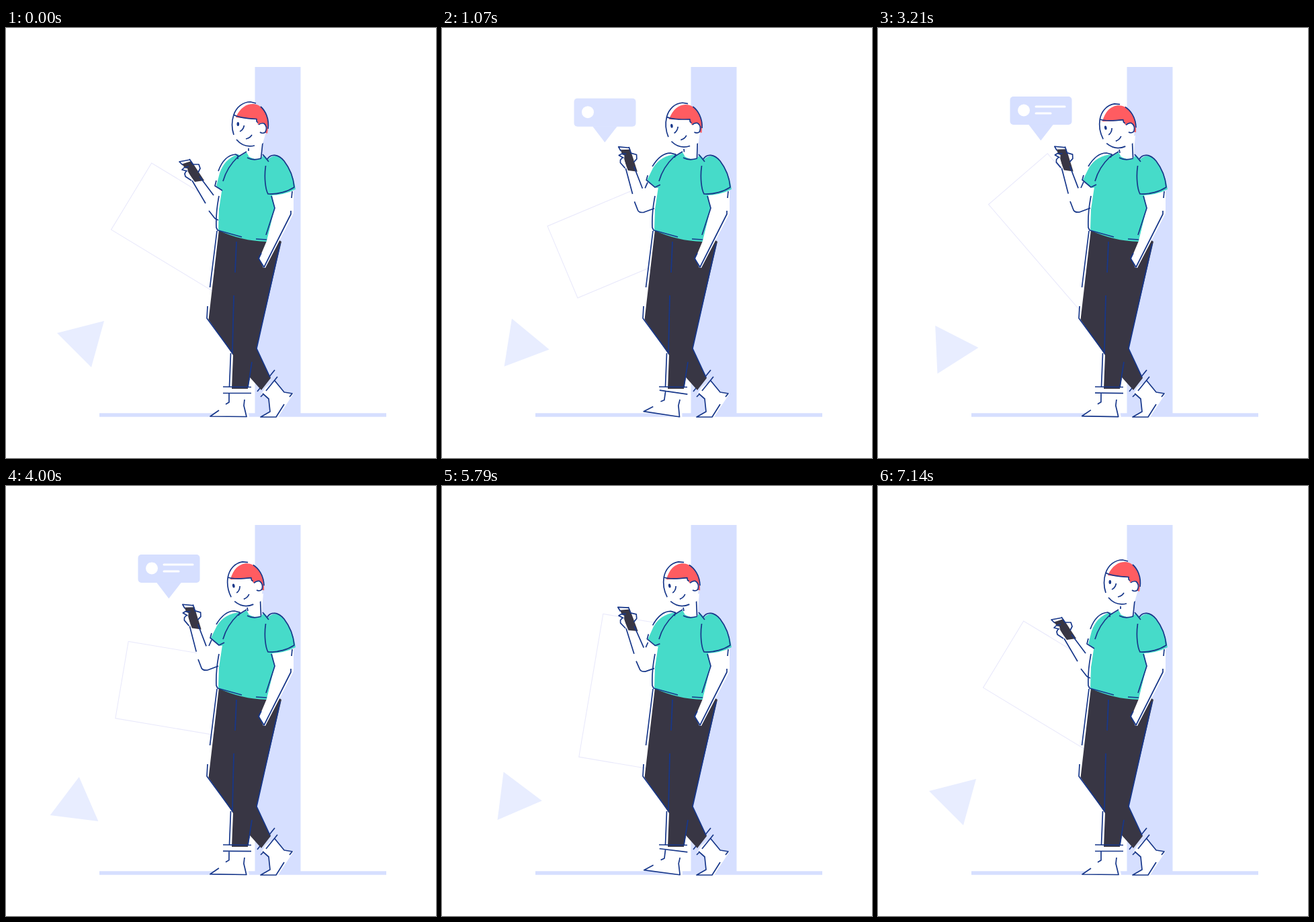
An HTML page for the animation above (7210 ms loop, 640 px wide and 640 px high).

```html
<!DOCTYPE html>
<html lang="en">
<head>
<meta charset="utf-8">
<title>Man with phone</title>
<style>
  html, body { margin: 0; width: 100%; height: 100%; overflow: hidden; background: #fff; }
  svg { display: block; width: 100%; height: 100%; }
  .line { fill: none; stroke: #17378a; stroke-width: 1.7; stroke-linejoin: round; }
  .white { fill: #fff; }
  .lilac { fill: #d6dfff; }
  .teal { fill: #46dbc9; }
  .dark { fill: #383644; }
  .red { fill: #ff5c61; }
  .text { stroke: #fff; stroke-width: 3; stroke-linecap: round; }
</style>
</head>
<body>
<svg viewBox="0 0 640 640">
  <rect id="frame" x="171" y="248.5" width="216" height="116" fill="none" stroke="#e9e9fb" stroke-width="1.1"/>
  <path id="triangle" d="M76,454 L146,436 L127,505Z" fill="#e8edff"/>
  <path class="lilac" d="M370.5,58 H438.5 V573.2 H566 V578.8 H139 V573.2 H370.5Z"/>

  <g id="bubble">
    <rect class="lilac" x="196.5" y="102" width="92" height="42" rx="5"/>
    <path class="lilac" d="M224,143.5 H261 L242.3,167.5Z"/>
    <circle class="white" cx="217" cy="122.5" r="9"/>
    <path id="text1" class="text"/>
    <path id="text2" class="text"/>
  </g>

  <!-- right foot -->
  <path class="white" d="M380,545 L386,535 L400,525 L414,541 L428,544 L405,579 H380 L393,571 L391,552Z"/>
  <path class="line" d="M374,541 L400,509 M379,549 L383,545 M387,540 L404,519 M400,525 L414,542 L426,544 L422,549 M414,560 L402,579 H379 L393,571 L391,552 L382,544"/>

  <!-- left foot -->
  <g id="foot">
    <path class="white" d="M332,536 L331,557 L304,578 L362,579 L358,553 L359,536Z"/>
    <path class="line" d="M323,543.5 H365 M332,544 V557 L327,560 M317,569 L304,578 L358,578.5 L354,562 L355,553"/>
  </g>
  <path class="white" d="M334,525 H362 V540 H334Z"/>

  <!-- trousers -->
  <path class="dark" d="M317,300 L301.5,434 L338,487 L336,537 H360 L363,520 L380,539 L394,521 L373,477 L410,318 L407,316Z"/>
  <path class="line" d="M323,534 L365,534.5 M314,302 L303.5,386 M300,414 L299,432 L338,485 M334.5,484 L332.5,534 M343,318 L341,364 M339,398 L337,482 M408,321 L373,477 L393,520 M366,497 L360,535"/>

  <!-- raised arm -->
  <path id="armFill" class="white"/>
  <path id="elbow" class="line"/>
  <g id="forearm">
    <path class="white" d="M258,199 L274,195 L279,203 L288,203 L289,209 L286,216 L290,223 L278,228 L268,222 L262,212Z"/>
    <path class="dark" d="M262,202.5 L276,198 L295,227 L281,229Z"/>
    <path class="white" d="M263,208 L270,209 L271,214 L275,221 L277,226 L268,221 L266,214Z"/>
    <path class="line" d="M274,196 L258,199 L263,204 M273,195 L279,204 M278,203 L287,203 L289,209 L286,215 M272,206 L265,208 L262,211 L270,213 M268,213 L266,217 L267,221 L276,227 M288,221 L309,249 M277,227 L297,261"/>
  </g>
  <path id="sleeveFill" class="teal"/>

  <!-- shirt -->
  <path class="teal" d="M358,185 L361,190 Q370,198 380,193 L384,189 L392,197 L400,268 L388,318 Q350,317 316,301 L317,270 L323,230 Q331,206 347,192Z"/>
  <path id="neck" class="white" d="M361,168 V191 Q370,197 380,193 L383,160Z"/>
  <path id="neckLines" class="line"/>
  <path id="sleeve" class="line"/>
  <path class="line" d="M323,228 Q329,207 345,192 L358,184 M359,193 Q368,198 380,194 M317,250 Q312,275 313,297 L315,301 L351,311 M372,314 L388,315"/>

  <!-- resting arm -->
  <path class="white" d="M396,249 L428,242 L428,276 L386,357 L383,357 L377,343 L388,317 L400,268Z"/>
  <path class="teal" d="M388,198 Q396,188 406,191 Q426,206 431,240 Q414,249 392,249 Q386,235 388,198Z"/>
  <path class="line" d="M382,188 L391,199 M389,195 C394,187 405,187 414,198 C424,211 428,225 429,237 C420,243 405,248 390,247 C386,240 384,222 386.5,205 M426,243 L425,253 M424,272 V277 L384,356 L376,343 L380,335 M395,250 L400,268 L387,308"/>

  <!-- head -->
  <g id="head">
    <path class="white" d="M339,127 Q334,150 343,166 Q354,179 370,175 L382,172 L387,155 L388,130 L366,111Z"/>
    <path class="red" d="M342,133 C349,118 358,113 368,113 C382,114 389,128 391,142 L389,157 L386,156 L384,143 L375,144 L373,136 L351,134Z"/>
    <path class="white" d="M375,144 Q379,140 384,142 Q390,147 386,155 Q381,158 375,154Z"/>
    <path class="line" d="M339,159 Q334,144 339,129 C343,118 352,110 364,110 L372,112 M379,117 C386,123 392,135 390,150 M343,166 Q354,179 370,175 M339,129 Q346,134 373,135.5 L373,139 L375,141 M376,144 Q379,141 384,142 Q390,147 386,155 Q382,158 378,155 M354.5,145 Q353,152 348,154 M357,165 Q363,164 366,159"/>
    <ellipse cx="345.3" cy="143" rx="1.8" ry="3" fill="#17378a"/>
  </g>
</svg>
<script>
const LOOP = 7210, STEP = 71.4, STEPS = 100;
const parts = {};
document.querySelectorAll('[id]').forEach(el => parts[el.id] = el);

const ramp = (t, from, to) => Math.min(1, Math.max(0, (t - from) / (to - from)));
const smooth = s => s * s * (3 - 2 * s);
const there = (t, a, b, c, d) => smooth(ramp(t, a, b)) - smooth(ramp(t, c, d));
const set = (id, name, value) => parts[id].setAttribute(name, value);

// Blends two paths that share the same commands.
function mix(a, b, k) {
  const ends = b.match(/-?[\d.]+/g);
  let i = 0;
  return a.replace(/-?[\d.]+/g, n => +n + (ends[i++] - n) * k);
}

// Paths with the arm lowered and raised.
const armPaths = {
  armFill: ['M278,227 L297,261 L312,285 L316,287 L322,242 L309,249 L290,222Z',
            'M275,208 L283,245 L292,274 L318,269 L320,236 L300,237 L289,212Z'],
  elbow: ['M302,272 L309,281 Q312,285 314,285 L316,286 M309,249 L309,249',
          'M286,258 L291,271 Q293,275 300,274 L316,268 M302,238 L306,229'],
  sleeveFill: ['M345,188 Q325,195 318,216 L313,235 L322,243 L335,240 L350,190Z',
               'M348,188 Q325,190 314,208 L305,226 L319,238 L335,235 L352,190Z'],
  sleeve: ['M316,213 C320,202 328,189 342,188 L345,190 L345,195 M313,227 L311,235 L319,240 L322,242',
           'M313,206 C319,196 328,186 340,186 L348,188 L346,193 M306,219 L304,226 L317,237 L325,233']
};
const neckPaths = ['M361,179 L361,183 M382,171 L379.5,194', 'M359,181 L360,186 M378.5,170 L379.5,193'];

function draw(t) {
  const turn = 360 * t / (STEP * STEPS);
  set('frame', 'transform', `rotate(${31.2 - turn} 279 306.5)`);
  set('triangle', 'transform', `rotate(${turn} 111 470.7)`);

  const arm = there(t, 427, 1141, 5585, 6299);
  for (const id in armPaths) set(id, 'd', mix(...armPaths[id], arm));
  set('forearm', 'transform', `translate(${0.5 * arm} ${-18 * arm}) rotate(${16 * arm} 277 212)`);

  const nod = there(t, 760, 1380, 5980, 6600);
  set('head', 'transform', `rotate(${-9.3 * nod} 376 186)`);
  set('neckLines', 'd', mix(...neckPaths, nod));

  // Nine toe taps per loop.
  const tap = (t / (STEP * STEPS) * 9 + 1e-9) % 1;
  const lift = (1 - Math.cos(2 * Math.PI * tap ** 0.85)) / 2;
  set('foot', 'transform', `rotate(${8.8 * lift} 354 547)`);

  const hidden = (1 - ramp(t, 500, 1570)) ** 3;
  const leave = smooth(ramp(t, 4800, 5500));
  set('bubble', 'transform', `translate(0 ${26 * hidden - 40 * leave})`);
  set('bubble', 'opacity', (1 - hidden) * (1 - leave));
  const typed = 1 - (1 - ramp(t, 1430, 2640)) ** 2;
  set('text1', 'd', typed ? `M235,117 h${43 * typed}` : '');
  set('text2', 'd', typed ? `M235,127 h${22 * typed}` : '');
}

const start = performance.now();
function tick() {
  const now = (performance.now() - start) % LOOP;
  draw(Math.min(STEPS, Math.floor((now + 5) / STEP)) * STEP);
  requestAnimationFrame(tick);
}
tick();
</script>
</body>
</html>
```
